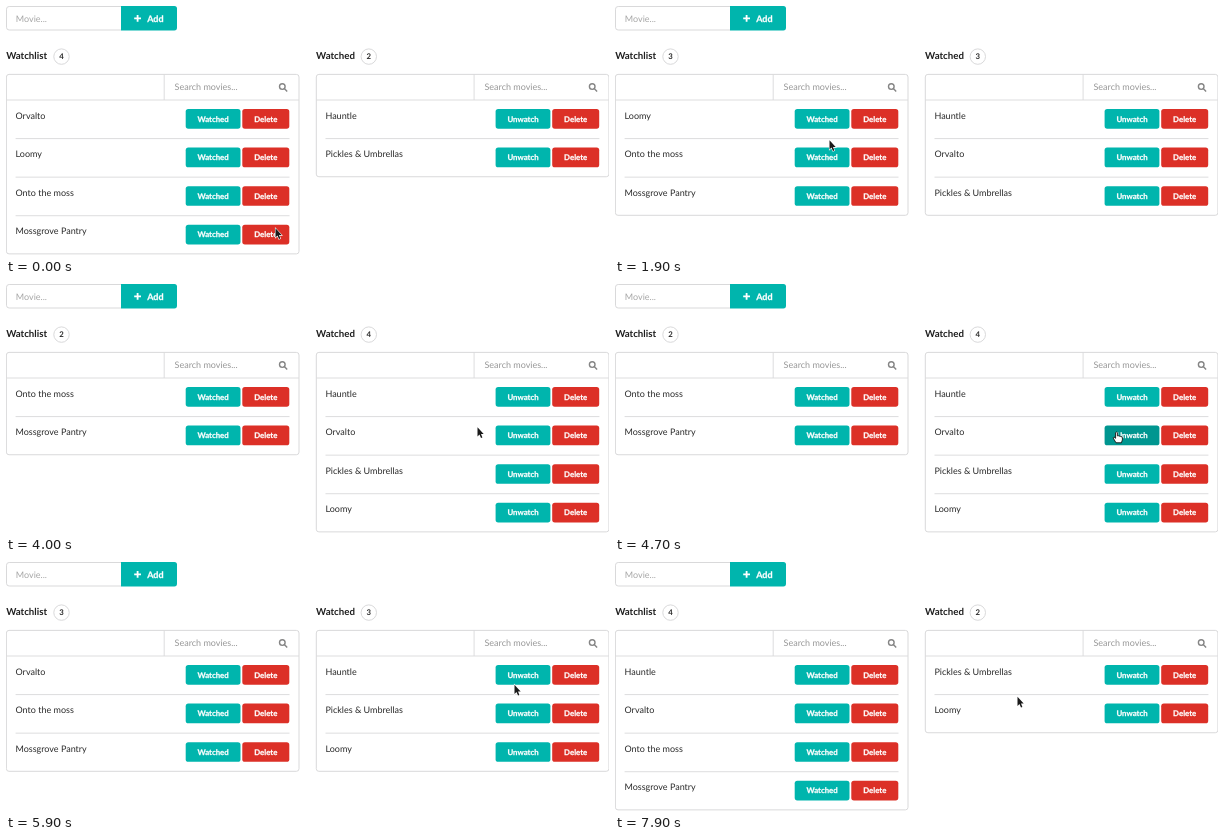
Animation of 603 by 250 pixels, one loop 8000 ms. Source, as an HTML page:

```html
<!DOCTYPE html>
<html lang="en">
<head>
<meta charset="utf-8">
<title>Movie watchlist</title>
<style>
  html, body { margin: 0; width: 100%; height: 100%; overflow: hidden; background: #fff; }
  svg { display: block; width: 603px; height: 250px; font-family: Lato, sans-serif; text-rendering: geometricPrecision; }
  text { fill: #2a2a2a; font-size: 9px; white-space: pre; }
  .bold { font-weight: 700; }
  .title { font-size: 9.7px; fill: #1f1f1f; }
  .small { font-size: 7.8px; text-anchor: middle; }
  .white { fill: #fff; stroke: #fff; stroke-width: .25; }
  .hint { fill: #979797; }
  .faint { fill: #a6a6a6; }
  .line { fill: none; stroke: #dadadb; stroke-width: .9; }
  .frame { fill: #fff; stroke: #d5d5d6; stroke-width: .9; }
  .icon { fill: none; stroke: #858585; stroke-width: 1.4; }
</style>
</head>
<body>
<svg id="stage" viewBox="0 0 603 250" xmlns="http://www.w3.org/2000/svg">
  <path class="frame" d="M115 .5H3.2Q.5 .5 .5 3.2V21.3Q.5 24 3.2 24H115"/>
  <text class="faint" x="9.8" y="15.5">Movie...</text>
  <path fill="#00b5ad" d="M115 0H168.4Q171 0 171 2.6V21.8Q171 24.4 168.4 24.4H115Z"/>
  <path stroke="#fff" stroke-width="1.8" d="M128.2 12.4H135M131.6 9V15.8"/>
  <text class="bold white" x="141.2" y="15.5">Add</text>
  <g id="lists"></g>
  <path id="arrow" fill="#1a1a1a" stroke="#fff" stroke-width="1.1" paint-order="stroke"
    d="M.5 .3V9.4L2.5 7.6L4 11L5.4 10.4L4 7.1H6.7Z"/>
  <path id="hand" fill="#fff" stroke="#111" stroke-width=".9" stroke-linejoin="round"
    d="M3.2 11.5L.9 7.6Q0 6 1.2 5.6L2.8 7V1.3Q3.7 .1 4.6 1.3V4.6Q5.6 4 6.3 4.9Q7.3 4.4 8 5.3Q9.5 5 9.6 6.5V8.6L8.6 11.5Z"/>
</svg>
<script>
const LOOP = 8000, ROW = 38.57, TOP = 68.4, HEAD = 94;
const TEAL = '#00b5ad', TEAL_DARK = '#009690', RED = '#dc3027';
const $ = id => document.getElementById(id);

const films = {
  o: 'Orvalto', l: 'Loomy', m: 'Onto the moss', p: 'Mossgrove Pantry',
  h: 'Hauntle', u: 'Pickles &amp; Umbrellas'
};

// Times are in tenths of a second: [from, watchlist, watched]
const lists = [
  [0, 'olmp', 'hu'],
  [15, 'lmp', 'hou'],
  [29, 'mp', 'houl'],
  [51, 'omp', 'hul'],
  [66, 'homp', 'ul']
];

// [from, to, panel, row]
const hovers = [
  [16, 18, 0, 0], [23, 29, 0, 0], [32, 33, 0, 0],
  [45, 51, 1, 1], [52, 56, 1, 1], [62, 66, 1, 0], [67, 72, 1, 0]
];

// [from, pointer, x, y]
const pointer = [
  [0, 'arrow', 269, 222], [1, 'hand', 257, 181],
  [4, 'arrow', 240, 155], [5, 'arrow', 219, 126], [7, 'hand', 211, 115],
  [16, 'hand', 211, 116], [17, 'hand', 212, 119], [18, 'arrow', 214, 129], [19, 'arrow', 214, 134],
  [22, 'arrow', 213, 128], [23, 'hand', 211, 118], [24, 'hand', 211, 115], [26, 'hand', 211, 114],
  [32, 'hand', 220, 117], [33, 'arrow', 258, 126], [34, 'arrow', 318, 134],
  [35, 'arrow', 384, 139], [36, 'arrow', 440, 142], [40, 'arrow', 471, 143], [42, 'hand', 486, 145],
  [44, 'hand', 490, 146], [45, 'hand', 494, 147], [46, 'hand', 497, 147.3], [47, 'hand', 497.8, 147.3],
  [52, 'hand', 499, 148.5], [54, 'hand', 500, 149.5],
  [56, 'arrow', 504, 141], [57, 'arrow', 506, 132], [59, 'arrow', 508, 122.5],
  [61, 'hand', 507, 117], [63, 'hand', 507, 115],
  [67, 'hand', 504, 116], [68, 'hand', 497, 118], [70, 'hand', 488.5, 118.5],
  [72, 'arrow', 474, 125], [73, 'arrow', 454, 131], [75, 'arrow', 435, 135],
  [77, 'arrow', 416, 134.5], [79, 'arrow', 402, 134.5]
];

const at = (table, t) => table.filter(step => step[0] <= t).pop();

const button = (x, y, w, label, fill) =>
  `<rect x="${x}" y="${y}" width="${w}" height="19.7" rx="2.6" fill="${fill}"/>
   <text class="bold small white" x="${x + w / 2}" y="${y + 12.5}">${label}</text>`;

function row(film, i, verb, dark) {
  const y = HEAD + i * ROW;
  const rule = i ? `<path class="line" d="M9.6 ${y}H283.5"/>` : '';
  return rule + `<text x="9.5" y="${y + 18.6}">${films[film]}</text>` +
    button(179.7, y + 9, 54.8, verb, dark ? TEAL_DARK : TEAL) +
    button(236.3, y + 9, 47, 'Delete', RED);
}

function panel(x, title, badge, verb, items, darkRow) {
  const h = HEAD + items.length * ROW - TOP - .4;
  const rows = [...items].map((film, i) => row(film, i, verb, i === darkRow)).join('');
  return `<g transform="translate(${x})">
    <text class="bold title" x=".2" y="53.2">${title}</text>
    <circle class="frame" cx="${badge}" cy="50.6" r="7.7"/>
    <text class="bold small" x="${badge}" y="53.4">${items.length}</text>
    <rect class="frame" x=".4" y="${TOP}" width="292.6" height="${h}" rx="2.6"/>
    <path class="line" d="M.4 ${HEAD}H293M158.2 ${TOP}V${HEAD}"/>
    <text class="hint" x="168.6" y="84.4">Search movies...</text>
    <circle class="icon" cx="276.3" cy="80.6" r="2.8"/>
    <path class="icon" d="M278.3 82.6L281.2 85.5"/>
    ${rows}</g>`;
}

let shown = '';
function draw(t) {
  const [, left, right] = at(lists, t);
  const hover = hovers.find(([from, to]) => t >= from && t < to) || [];
  const darkRow = side => hover[2] === side ? hover[3] : -1;
  const key = [left, right, hover].join();
  if (key !== shown) {
    shown = key;
    $('lists').innerHTML =
      panel(0, 'Watchlist', 55.5, 'Watched', left, darkRow(0)) +
      panel(309.9, 'Watched', 52.9, 'Unwatch', right, darkRow(1));
  }
  const [, kind, x, y] = at(pointer, t);
  for (const id of ['arrow', 'hand']) {
    $(id).setAttribute('visibility', id === kind ? 'visible' : 'hidden');
    $(id).setAttribute('transform', `translate(${x} ${y})`);
  }
}

const start = performance.now();
function tick(now) {
  draw(Math.max(0, now - start) % LOOP / 100);
  requestAnimationFrame(tick);
}
draw(0);
requestAnimationFrame(tick);
</script>
</body>
</html>
```
